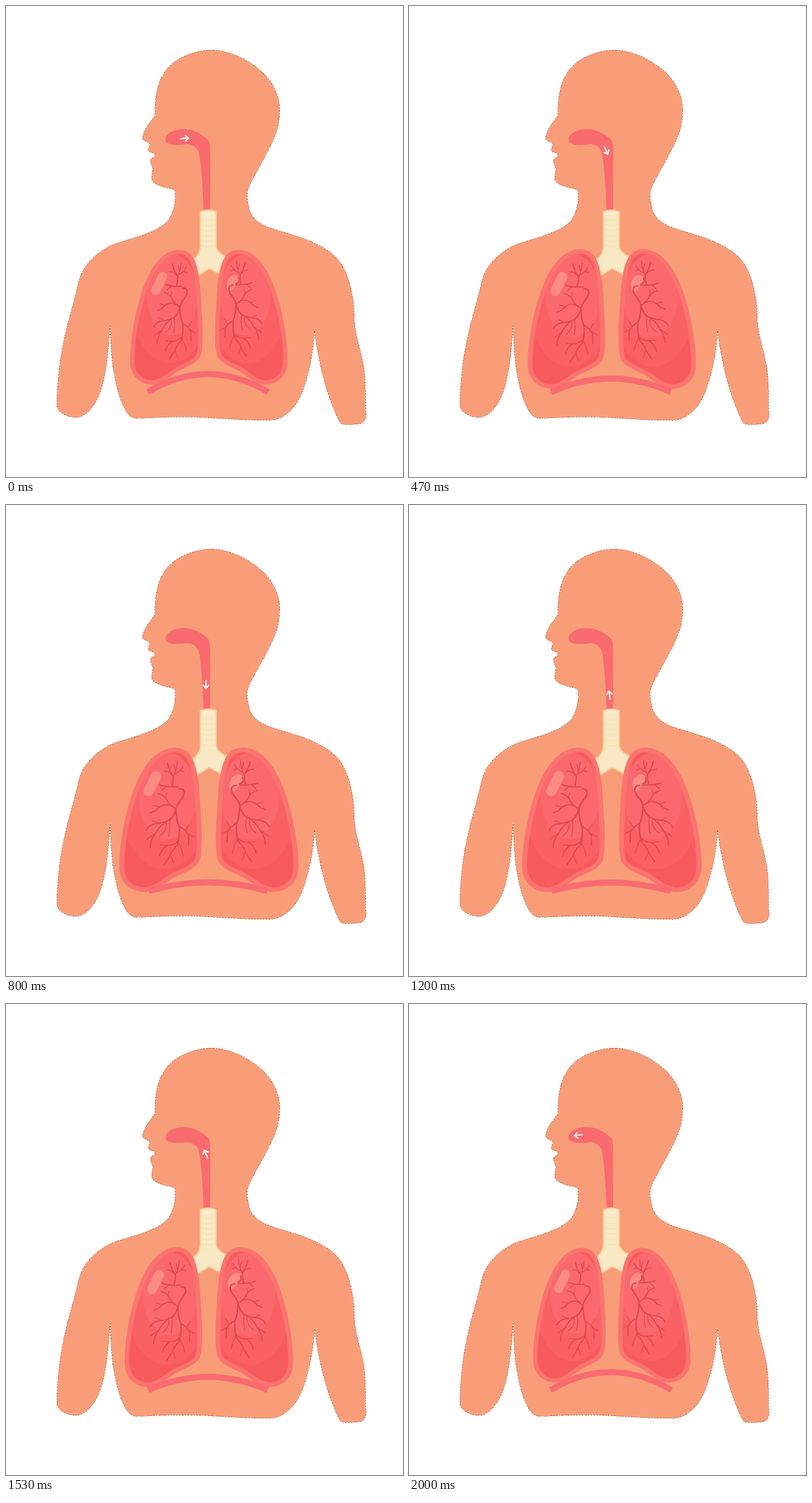
Write an HTML page that moves like this. It is 687 px wide and 815 px high and loops after 2070 ms.

```html
<!DOCTYPE html>
<html lang="en">
<head>
<meta charset="utf-8">
<title>Breathing</title>
<style>
  html, body { margin: 0; width: 100%; height: 100%; overflow: hidden; background: #fff; }
  svg { display: block; width: 100%; height: 100%; }
  .line { fill: none; stroke-linecap: round; stroke-linejoin: round; }
</style>
</head>
<body>
<svg viewBox="0 0 687 815">
  <defs>
    <path id="lungShape" d="M301 425.5C273 425 253 455 240.500 490C226.500 530 218.500 580 218.500 613C218.500 640 236 652 255 651.5C270 650 281 638 295 629.500C309 621 330 616 334 601C337.500 585 337 560 335 530C333 500 333 470 325 447C320 432 311 426 301 425.5Z"/>
    <clipPath id="lungClip"><use href="#lungShape"/></clipPath>
    <g id="lung">
      <g clip-path="url(#lungClip)">
        <rect x="205" y="415" width="145" height="250" fill="#f75a5d"/>
        <ellipse cx="284" cy="530" rx="63" ry="88" fill="#f96164"/>
        <ellipse cx="288" cy="500" rx="44" ry="70" fill="#fa696d"/>
      </g>
      <use href="#lungShape" fill="none" stroke="#fb746f" stroke-width="7.600"/>
    </g>
    <g id="vessels" class="line" stroke="#de4851">
      <path stroke-width="2.4" d="M306 488C315 488 315 496 310 504Q302 514 301 521M301 521Q298 533 291 539M301 521Q301 538 306 550Q307 566 303 579"/>
      <path stroke-width="1.8" d="M301 521Q291 513 285 514Q275 516 270 524L262 527M297 518Q289 512 286 504Q282 498 274 496M291 539Q281 544 269 545Q260 547 256 555M284 543Q274 551 270 561Q262 570 262 583M303 579Q293 590 292 597L283 611M304 573Q298 580 288 580Q279 585 276 597M306 549Q316 555 320 564L320 579"/>
      <path stroke-width="1.3" d="M276 518L266 515M285 502L287 495M277 545L265 540M269 561L257 570M286 542Q288 556 276 565M291 539Q293 552 290 565M293 596L297 608M288 580L277 579M304 574Q310 585 312 597M318 560L328 566M315 556L321 546"/>
    </g>
    <g id="twigs" class="line" stroke="#de4851">
      <path stroke-width="2" d="M288 447Q291 460 297 468Q297 477 295 484M276 482Q287 486 304 485"/>
      <path stroke-width="1.4" d="M303 445Q302 460 297 468M312 452Q309 460 298 465M283 460Q290 459 295 466M287 484L279 491M300 458L298 449M308 459L313 461"/>
    </g>
  </defs>

  <path id="outline" fill="#f99d79" stroke="#85573f" stroke-width=".7" stroke-dasharray="3 2" shape-rendering="crispEdges"/>
  <path fill="#f96b6e" d="M276 231C277 220 291 213 307 213C327 213 342 224 350 232C354 238 353 250 353.500 265L353 356H342C341 320 338 270 333 251C328 242 320 239 314 239C300 241 276 243 276 231Z"/>

  <path fill="#f9e8c4" stroke="#fbd19a" stroke-width="2.2" d="M336.500 356Q350 350 363.500 356V416C365 426 375 432 386 436L380 469L351.500 454L323 472L322 440C332 434 336 424 336.500 416Z"/>
  <g id="rings" class="line" stroke="#f7e2b7" stroke-width="1.800"></g>
  <ellipse cx="350" cy="359" rx="12" ry="3.500" fill="#fbeccd"/>

  <g id="lungs">
    <use href="#lung"/>
    <rect x="257" y="458.500" width="16" height="43" rx="8" fill="#fb8c83" transform="rotate(25 265 480)"/>
    <use href="#vessels"/>
    <use href="#twigs"/>
    <use href="#lung" transform="translate(702) scale(-1 1)"/>
    <path fill="#fb8c83" d="M382 483C382 473 389 464 397 465C404 466 404 473 399 479C395 484 393 493 387 493C383 492 382 488 382 483Z"/>
    <use href="#vessels" transform="translate(699 -5) scale(-1 1)"/>
    <use href="#twigs" transform="translate(702 -3) scale(-1 1)"/>
    <path class="line" stroke="#de4851" stroke-width="2" d="M402 470Q406 478 398 480"/>
  </g>

  <path id="diaphragm" fill="none" stroke="#f96b70" stroke-width="10.500"/>
  <path id="arrow" class="line" stroke="#fff" stroke-width="2.200" d="M-7 0H7M1.500-4.700L7 0L1.500 4.700"/>
</svg>
<script>
const LOOP = 2070, STEP = 200 / 3, LAST = 30;
const el = id => document.getElementById(id);

const rightSide = `M358 76C400 78 445 108 460 134S476 178 471 207S426 297 419 316
  C414 331 420 341 421 353C428 372 445 380 463 386C500 397 550 410 575 439
  C590 457 603 495 603 545C605 585 622 605 622 665L622 697C624 705 624 711 621 716
  C617 725 608 723 600 724C590 724 580 726 577 719C555 675 541 620 534 562
  C532 600 524 640 511 672C502 694 480 718 455 717`;
const leftSide = `C400 717 345 711 308 711S240 714 222 713C212 711 205 698 199 683
  C185 645 181 600 180.5 551C177 595 174 640 162 671C150 700 135 711 121 712
  C108 712 90 705 88 692C88 660 93 610 99 585C104 555 120 505 126 477
  C133 447 157 427 180 415C205 404 260 395 281 371C290 356 293 345 293 325`;
const face = `C293 314 283 317 275 314C262 310 252 306 252 298C252 290 256 282 253 278
  C248 268 249 262 257 262L257 255C250 254 244 251 247 247C246 243 251 240 248 237
  C240 234 234 231 237 225C240 212 248 203 258 189C257 155 262 125 285 102
  C305 84 335 76 358 76Z`;
el('outline').setAttribute('d', rightSide + leftSide + face);

el('rings').innerHTML = Array.from({ length: 6 }, (_, i) =>
  `<path d="M338 ${368 + i * 9.2}q12 6 24 0"/>`).join('');

// Arrow poses: step, x, y, heading in degrees
const inhale = [[0, 309, 229, -5], [4, 332, 234, 35], [7, 341, 250, 63],
  [9, 345, 272, 85], [12, 346, 310.5, 90], [15, 346, 346, 90]];
const exhale = [[16, 347, 350, -92], [18, 347, 329, -98], [23, 346, 259.5, -112],
  [24, 344, 247, -122], [26, 332, 230, -155], [28, 313, 224, -178], [30, 293, 227, -190]];

function poseAt(keys, n) {
  const i = Math.max(1, keys.findIndex(k => k[0] >= n));
  const a = keys[i - 1], b = keys[i];
  const f = (n - a[0]) / (b[0] - a[0]);
  return a.map((v, j) => v + (b[j] - v) * f);
}

function draw(time) {
  const n = Math.min(LAST, Math.floor((time % LOOP + 4) / STEP));
  const breath = (1 - Math.cos(2 * Math.PI * n / 30.2)) / 2;

  const sx = 1 + 0.153 * breath, sy = 1 + 0.0778 * breath;
  el('lungs').setAttribute('transform',
    `translate(351 450) scale(${sx} ${sy}) translate(-351 -450)`);

  const inset = 2 * breath, apex = 637 + 17.7 * breath;
  el('diaphragm').setAttribute('d',
    `M${245 + inset} 668Q349.5 ${2 * apex - 668} ${454 - inset} 668`);

  const [, x, y, heading] = poseAt(n < 16 ? inhale : exhale, n);
  el('arrow').setAttribute('transform', `translate(${x} ${y}) rotate(${heading})`);
}

const start = performance.now();
function tick() {
  draw(performance.now() - start);
  requestAnimationFrame(tick);
}
tick();
</script>
</body>
</html>
```
